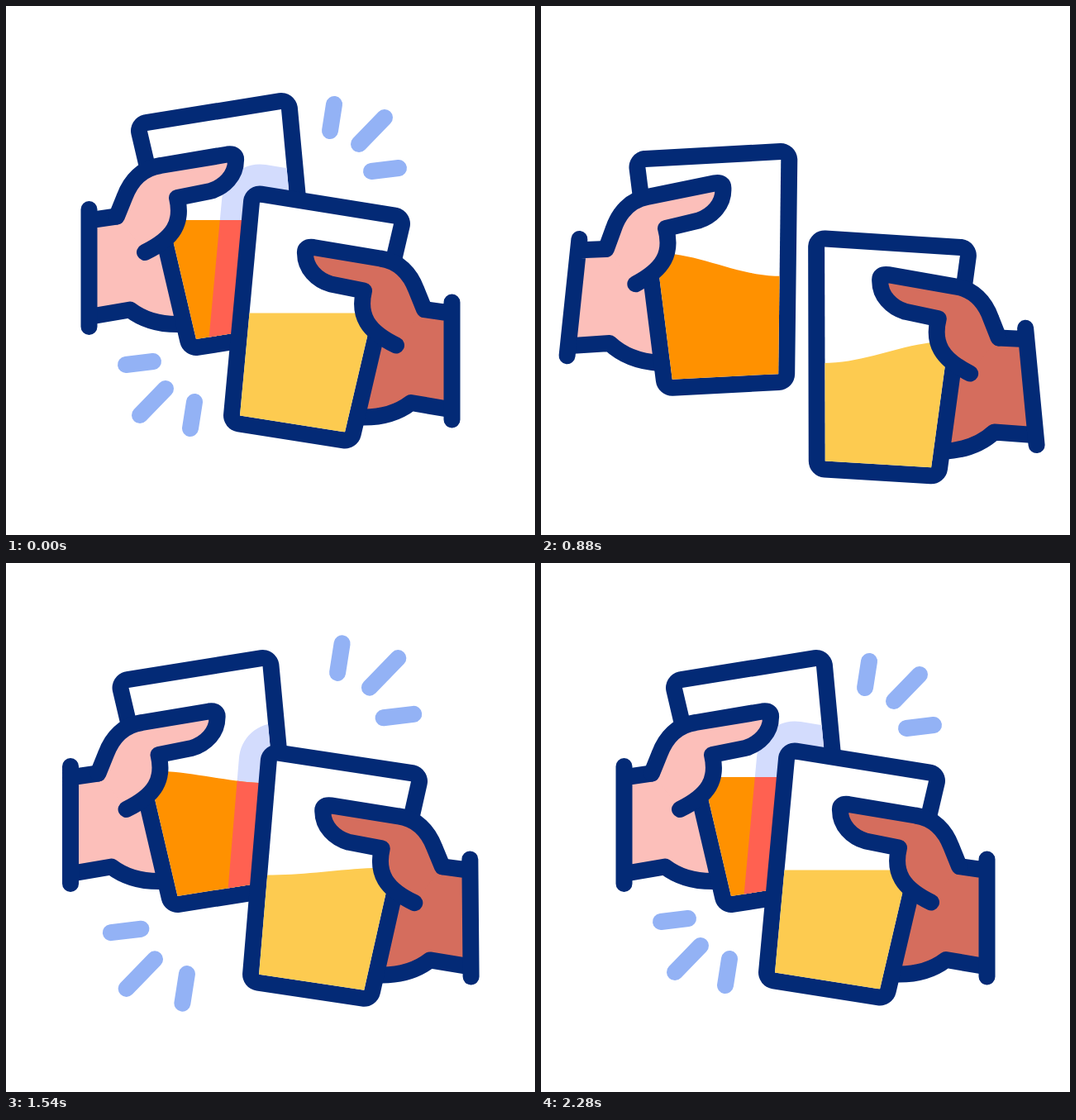
These frames come from a looping animation (640 by 640 pixels, 2560 ms). An HTML page:

```html
<!DOCTYPE html>
<html lang="en">
<head>
<meta charset="utf-8">
<title>Cheers</title>
<style>
  html, body { margin: 0; width: 100%; height: 100%; overflow: hidden; background: #fff; }
  svg { display: block; width: 100vw; height: 100vh; }
  .ink { stroke: #032a76; stroke-width: 20; stroke-linecap: round; stroke-linejoin: round; fill: none; }
  .rim { stroke: #032a76; stroke-width: 40; stroke-linejoin: round; }
  .shade { stroke-width: 92; stroke-linejoin: round; }
  .rays { stroke: #93b2f5; stroke-width: 20; stroke-linecap: round; }
</style>
</head>
<body>
<svg id="stage" viewBox="0 0 640 640"></svg>
<script>
const LOOP = 2560;
const MIRROR = 'matrix(-1 0 0 1 640 112.5)';
const GLASS = '171,151 333,125 357,383 230,403';
const THUMB = 'M134 254.5L143.5 231C151 211 165 196 187 193L268 179.5Q279 178 278 187' +
  'C278 205 264 219 247 224L207 232C214 262 203 281 168 298';
const WRIST = { x: 100.5, y: 317 };
const KNUCKLE = { x: 134, y: 254.5 };
const SURFACE = { x: 271, y: 259, half: 76 };
const BURST = { x: 310, y: 315 };
const RAYS = [[397, 119, 392, 151], [458, 135, 427, 167], [475, 196, 442, 200]];

// Quadratic ease in and out, from 0 at time a to 1 at time b.
function ramp(t, a, b) {
  const u = Math.min(1, Math.max(0, (t - a) / (b - a)));
  return u < 0.5 ? 2 * u * u : 1 - 2 * (1 - u) ** 2;
}
// Rises between a and b, falls between c and d.
const pulse = (t, [a, b, c, d]) => ramp(t, a, b) - ramp(t, c, d);

// Each span lists when a movement starts, peaks, turns back and ends.
const LEFT = {
  away: 63, awaySpan: [330, 790, 830, 1300],
  turn: 6, turnSpan: [380, 820, 900, 1300], rest: 0,
  bend: 8, bendSpan: [540, 820, 1060, 1400],
  tiltSpan: [440, 840, 880, 1240], slosh: 20,
  press: 0, recoil: 1225
};
const RIGHT = {
  away: 69, awaySpan: [220, 745, 785, 1070],
  turn: 4.2, turnSpan: [220, 760, 800, 1200], rest: 1.6,
  bend: 6, bendSpan: [240, 520, 880, 1120],
  tiltSpan: [300, 720, 830, 1100], slosh: 12,
  press: 10, recoil: 1195
};

function pose(t, cup) {
  const away = cup.away * pulse(t, cup.awaySpan);
  const bounce = cup.press * pulse(t, [950, 1120, 1120, 1280]) -
    32 * pulse(t, [cup.recoil, 1430, 1430, 1770]) +
    12.7 * pulse(t, [1430, 1770, 1780, 2280]);
  // The clink sets off a decaying slosh in the drink.
  const since = Math.max(0, t - 1280);
  const slosh = cup.slosh * pulse(t, [1100, 1280, 1800, 2280]) *
    Math.exp(-since / 300) * Math.cos(2 * Math.PI * since / 460);
  return {
    x: bounce - away,
    y: 0.58 * away,
    turn: cup.turn * pulse(t, cup.turnSpan) + cup.rest * pulse(t, [220, 760, 1300, 1700]),
    bend: -cup.bend * pulse(t, cup.bendSpan),
    tilt: 14 * pulse(t, cup.tiltSpan) - slosh
  };
}

function cupMarkup(id, skin, drink, mirror, shaded) {
  const shade = color => shaded
    ? `<polygon class="shade" points="${GLASS}" fill="${color}" stroke="${color}"/>` : '';
  return `<g id="${id}" ${mirror ? `transform="${MIRROR}"` : ''}>
    <clipPath id="${id}-glass"><polygon class="body" points="${GLASS}"/></clipPath>
    <clipPath id="${id}-drink"><path class="liquid"/></clipPath>
    <g class="body">
      <path d="M100 259L134 254.5H190L215 385C188 386 165 379 150 367.5L100 376Z" fill="${skin}"/>
      <path class="ink" d="M103 375.5L150 367.5C165 379 185 386 212 385"/>
      <polygon class="rim" points="${GLASS}"/>
    </g>
    <g clip-path="url(#${id}-glass)">
      <rect width="640" height="640" fill="#fff"/>
      ${shade('#d3dcfd')}
      <path class="liquid" fill="${drink}"/>
      <g clip-path="url(#${id}-drink)">${shade('#ff6151')}</g>
    </g>
    <g class="body">
      <path class="ink" d="M103 259L134 254.5M100.5 246V388"/>
      <path class="thumb ink" d="${THUMB}" style="fill:${skin}"/>
    </g>
  </g>`;
}

const stage = document.getElementById('stage');
stage.innerHTML = '<g class="rays">' + '<line/>'.repeat(6) + '</g>' +
  cupMarkup('left', '#fcbfba', '#ff9100', false, true) +
  cupMarkup('right', '#d56d5d', '#fdcb50', true, false);
const rays = [...stage.querySelectorAll('.rays line')];
const shades = [...stage.querySelectorAll('.shade')];
const setAll = (nodes, name, value) => nodes.forEach(n => n.setAttribute(name, value));

function liquidPath(p) {
  const a = p.turn * Math.PI / 180;
  const dx = SURFACE.x - WRIST.x, dy = SURFACE.y - WRIST.y;
  const cx = WRIST.x + p.x + dx * Math.cos(a) - dy * Math.sin(a);
  const cy = WRIST.y + p.y + dx * Math.sin(a) + dy * Math.cos(a);
  let d = `M${cx - 130} 700`;
  for (let i = -13; i <= 13; i++) {
    const u = Math.max(-1, Math.min(1, i / 10));
    d += `L${cx + i / 10 * SURFACE.half} ${cy + p.tilt * Math.sin(Math.PI * u / 2)}`;
  }
  return d + `L${cx + 130} 700Z`;
}

function makeCup(id, cup) {
  const root = document.getElementById(id);
  const find = name => [...root.querySelectorAll('.' + name)];
  const bodies = find('body'), thumbs = find('thumb'), liquids = find('liquid');
  return t => {
    const p = pose(t, cup);
    const move = `translate(${p.x} ${p.y}) rotate(${p.turn} ${WRIST.x} ${WRIST.y})`;
    setAll(bodies, 'transform', move);
    setAll(thumbs, 'transform', `rotate(${p.bend} ${KNUCKLE.x} ${KNUCKLE.y})`);
    setAll(liquids, 'd', liquidPath(p));
    return move;
  };
}
const drawLeft = makeCup('left', LEFT);
const drawRight = makeCup('right', RIGHT);

function burstScale(t) {
  if (t < 800) return 1 + 0.2 * ramp(t, 220, 500);
  return 1.08 + 0.134 * ramp(t, 1130, 1370) - 0.249 * ramp(t, 1370, 1745) +
    0.035 * ramp(t, 1760, 2260);
}

function drawRays(t) {
  const scale = burstScale(t);
  const length = 1 - pulse(t, [220, 500, 1150, 1520]);
  rays.forEach((ray, i) => {
    const [x1, y1, x2, y2] = RAYS[i % 3];
    const k = i < 3 ? scale : -scale;
    const place = (end, x, y) => {
      ray.setAttribute('x' + end, BURST.x + (x - BURST.x) * k);
      ray.setAttribute('y' + end, BURST.y + (y - BURST.y) * k);
    };
    place(1, x1, y1);
    place(2, x1 + (x2 - x1) * length, y1 + (y2 - y1) * length);
    ray.setAttribute('visibility', length > 0.01 ? 'visible' : 'hidden');
  });
}

function draw(t) {
  drawRays(t);
  drawLeft(t);
  // The front glass casts its widened outline onto the one behind.
  setAll(shades, 'transform', `${MIRROR} ${drawRight(t)}`);
}

const start = performance.now();
function frame() {
  draw((performance.now() - start) % LOOP);
  requestAnimationFrame(frame);
}
frame();
</script>
</body>
</html>
```
